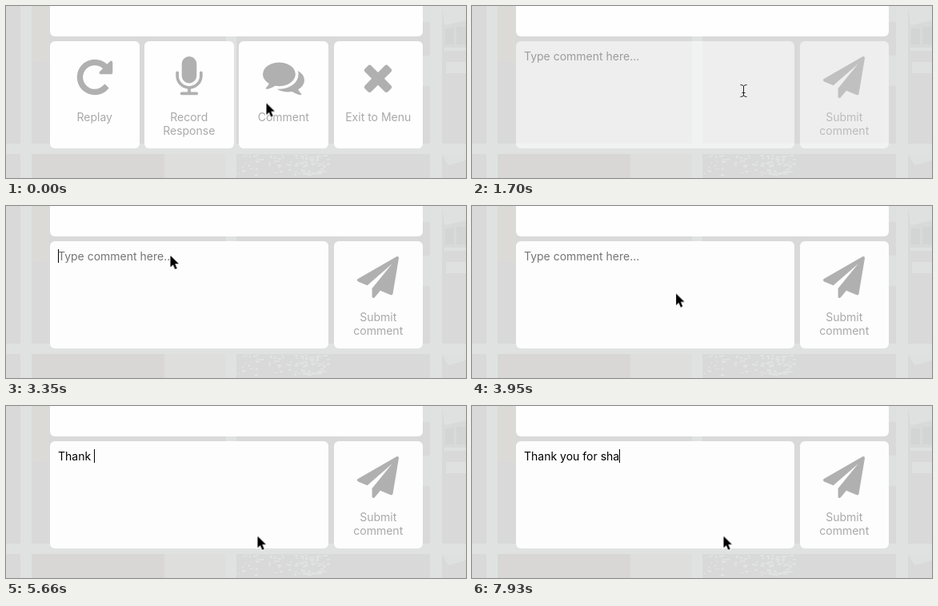
An HTML page that plays this animation: 575x215 px, repeating every 7990 ms.

```html
<!DOCTYPE html>
<html lang="en">
<head>
<meta charset="utf-8">
<title>Comment box</title>
<style>
  :root { --loop: 7990ms; }
  html, body { margin: 0; width: 100%; height: 100%; overflow: hidden; background: #dfe2e1; }
  body { position: relative; font: 14px/17px Inter, "Open Sans", sans-serif; }
  #wall, .card, .group, .icon, .label, #field, #arrow, #ibeam { position: absolute; }
  #wall { left: 0; top: 0; }
  .group { inset: 0; }
  .card { top: 44px; width: 111.5px; height: 134px; border-radius: 6px; background: #fefefe; }
  .top { left: 55px; top: -10px; width: 466px; height: 48px; }
  .icon { left: 50%; top: 18.6px; width: 52px; height: 52px; margin-left: -26px; fill: #b0b0b0; }
  .label { left: 0; right: 0; top: 86px; text-align: center; color: #a9a9a9; }
  .c1 { left: 55px; } .c2 { left: 173px; } .c3 { left: 291px; } .c4 { left: 409.5px; }
  .wide { left: 55px; width: 348px; }
  .form .card { background: #fdfdfd; }
  #field { left: 65px; top: 54px; white-space: pre; color: #000; }
  #hint { position: absolute; left: 0; top: 0; color: #757575; }
  #caret { display: inline-block; width: 1px; height: 17px; margin-right: -1px; vertical-align: top; background: #000; }
  #arrow, #ibeam { left: 0; top: 0; overflow: visible; }

  .menu  { animation: leave var(--loop) step-end infinite; }
  .form  { animation: enter var(--loop) step-end infinite; }
  #arrow { animation: move var(--loop) linear infinite, swap var(--loop) step-end infinite; }
  #ibeam { transform: translate(339px, 106px); animation: beam var(--loop) step-end infinite; }

  @keyframes leave { 0% { opacity: 1 } 19.71%, 100% { opacity: 0 } }
  @keyframes enter {
    0% { opacity: 0 } 19.71% { opacity: .05 } 20.46% { opacity: .33 }
    21.21% { opacity: .61 } 21.96% { opacity: .9 } 22.7%, 100% { opacity: 1 }
  }
  @keyframes swap { 0% { opacity: 1 } 19.71% { opacity: 0 } 27.1%, 100% { opacity: 1 } }
  @keyframes beam { 0% { opacity: 0 } 19.71% { opacity: 1 } 27.1%, 100% { opacity: 0 } }
  @keyframes move {
    0%     { transform: translate(325.5px, 121.5px); animation-timing-function: steps(5) }
    3.45%  { transform: translate(325.5px, 107px) }
    6.38%  { transform: translate(325.5px, 107px); animation-timing-function: steps(5) }
    10.06% { transform: translate(335.5px, 105.5px); animation-timing-function: steps(2) }
    11.54% { transform: translate(337px, 106px); animation-timing-function: step-end }
    13.84% { transform: translate(338px, 106px) }
    26.35% { transform: translate(338px, 106px); animation-timing-function: steps(3) }
    28.72% { transform: translate(336px, 111px); animation-timing-function: steps(10) }
    36.61% { transform: translate(238px, 68px); animation-timing-function: steps(7) }
    41.86% { transform: translate(205.5px, 62px) }
    44.12% { transform: translate(205.5px, 62px); animation-timing-function: steps(13) }
    54.5%  { transform: translate(313px, 165px) }
    55.26% { transform: translate(313px, 165px); animation-timing-function: steps(2) }
    56.76%, 100% { transform: translate(314.5px, 162.8px) }
  }
</style>
</head>
<body>
<svg id="wall" width="575" height="215">
  <g fill="#d9d9d9">
    <path d="M0 0H18V172H0zM32 0H275V172H32zM288 0H530V172H288zM545 0H575V172H545z"/>
    <path d="M0 185H18V215H0zM32 185H275V215H32zM288 185H530V215H288zM545 185H575V215H545z"/>
  </g>
  <path d="M32 0H54V70H32z" fill="#dcdad7"/>
  <path d="M32 185H198V215H32z" fill="#d9d7d6"/>
  <path d="M198 185H275V215H198z" fill="#dededc"/>
  <path d="M521 0H530V20H521zM521 62H530V100H521z" fill="#dfe0e0"/>
  <path d="M545 0H575V18L548 24zM548 52H575V56H548zM550 70H575V84H550z" fill="#dfe1e1"/>
  <path d="M549 28H560V48H549zM563 26H575V48H563z" fill="#d3d4d4"/>
  <path d="M545 185H575V193L553 199z" fill="#dfe1e1"/>
  <g id="leaves" fill="#e0e2e2"></g>
</svg>

<div class="card top"></div>

<div class="group menu">
  <div class="card c1">
    <svg class="icon" viewBox="0 0 1792 1792"><path d="M1664 256v448q0 26-19 45t-45 19h-448q-42 0-59-40-17-39 14-69l138-138q-148-137-349-137-104 0-198.5 40.5t-163.5 109.5-109.5 163.5-40.5 198.5 40.5 198.5 109.5 163.5 163.5 109.5 198.5 40.5q119 0 225-52t179-147q7-10 23-12 15 0 25 9l137 138q9 8 9.5 20.5t-7.5 22.5q-109 132-264 204.5t-327 72.5q-156 0-298-61t-245-164-164-245-61-298 61-298 164-245 245-164 298-61q147 0 284.5 55.5t244.5 156.5l130-129q29-31 70-14 39 17 39 59z"/></svg>
    <div class="label">Replay</div>
  </div>
  <div class="card c2">
    <svg class="icon" viewBox="0 0 1792 1792"><path d="M1472 704v128q0 221-147.5 384.5t-364.5 187.5v132h256q26 0 45 19t19 45-19 45-45 19h-640q-26 0-45-19t-19-45 19-45 45-19h256v-132q-217-24-364.5-187.5t-147.5-384.5v-128q0-26 19-45t45-19 45 19 19 45v128q0 185 131.5 316.5t316.5 131.5 316.5-131.5 131.5-316.5v-128q0-26 19-45t45-19 45 19 19 45z"/><rect x="576" width="640" height="1152" rx="320"/></svg>
    <div class="label">Record<br>Response</div>
  </div>
  <div class="card c3">
    <svg class="icon" viewBox="0 0 1792 1792"><path d="M1408 768q0 139-94 257t-256.5 186.5-353.5 68.5q-86 0-176-16-124 88-278 128-36 9-86 16-24 1-32-19t6-33l43-52q62-62 85-135-124-72-195-177t-71-224q0-139 94-257t256.5-186.5 353.5-68.5 353.5 68.5 256.5 186.5 94 257z"/><path d="M1792 1024q0 120-71 224.5t-195 176.5q23 73 85 135l43 52q14 13 6 33t-32 19q-50-7-86-16-154-40-278-128-90 16-176 16-271 0-472-132 58 4 88 4 161 0 309-45t264-129q125-92 192-212t67-254q0-77-23-152 129 71 204 178t75 230z"/></svg>
    <div class="label">Comment</div>
  </div>
  <div class="card c4">
    <svg class="icon" viewBox="0 0 1792 1792"><path d="M1490 1322q0 40-28 68l-136 136q-28 28-68 28t-68-28l-294-294-294 294q-28 28-68 28t-68-28l-136-136q-28-28-28-68t28-68l294-294-294-294q-28-28-28-68t28-68l136-136q28-28 68-28t68 28l294 294 294-294q28-28 68-28t68 28l136 136q28 28 28 68t-28 68l-294 294 294 294q28 28 28 68z"/></svg>
    <div class="label">Exit to Menu</div>
  </div>
</div>

<div class="group form">
  <div class="card wide"></div>
  <div id="field"><span id="hint">Type comment here...</span><span id="typed"></span><i id="caret"></i></div>
  <div class="card c4">
    <svg class="icon" viewBox="0 0 1792 1792"><path d="M1764 11q33 24 27 64l-256 1536q-5 29-32 45-14 8-31 8-11 0-24-5l-453-185-242 295q-18 23-49 23-13 0-22-4-19-7-30.5-23.5t-11.5-36.5v-349l864-1059-1069 925-395-162q-37-14-40-55-2-40 32-59l1664-960q15-9 32-9 20 0 36 11z"/></svg>
    <div class="label">Submit<br>comment</div>
  </div>
</div>

<svg id="arrow" width="12" height="18"><path d="M0 0V14.4L3.3 11.3L5.8 17L8.2 16L5.8 10.3H10.4Z" stroke="#fff" stroke-width="2" paint-order="stroke"/></svg>
<svg id="ibeam" width="8" height="16"><path d="M-3.5 -7.5Q0 -7.5 .5 -5.5Q1 -7.5 4.5 -7.5M.5 -6V6.5M-3.5 7.5Q0 7.5 .5 5.5Q1 7.5 4.5 7.5M-1.5 2.5H2.5" fill="none" stroke="#222"/></svg>

<script>
  const LOOP = 7990, FOCUS = 3340, BLINK = 500;
  const TEXT = "Thank you for sha";
  const keys = [5200, 5380, 5450, 5520, 5590, 5660, 6080, 6160, 6240, 6320,
                6890, 6980, 7070, 7160, 7770, 7850, 7930].map(k => k - 5);
  const $ = id => document.getElementById(id);
  const hint = $("hint"), typed = $("typed"), caret = $("caret");

  // Mottled foliage in the lower tile
  let seed = 7;
  const rand = () => (seed = seed * 16807 % 2147483647) / 2147483647;
  let spots = "";
  for (let i = 0; i < 110; i++) {
    const x = 290 + rand() * 112, y = 186 + rand() * 25;
    spots += `<rect x="${x | 0}" y="${y | 0}" width="${2 + rand() * 4 | 0}" height="${1 + rand() * 3 | 0}"/>`;
  }
  $("leaves").innerHTML = spots;

  let start;
  function draw(now) {
    start ??= now;
    const t = (now - start) % LOOP;
    const count = keys.filter(k => t >= k).length;
    const since = t - (count ? keys[count - 1] : FOCUS);
    typed.textContent = TEXT.slice(0, count);
    hint.style.visibility = count ? "hidden" : "inherit";
    caret.style.opacity = since >= 0 && Math.floor(since / BLINK) % 2 === 0 ? 1 : 0;
    requestAnimationFrame(draw);
  }
  requestAnimationFrame(draw);
</script>
</body>
</html>
```
